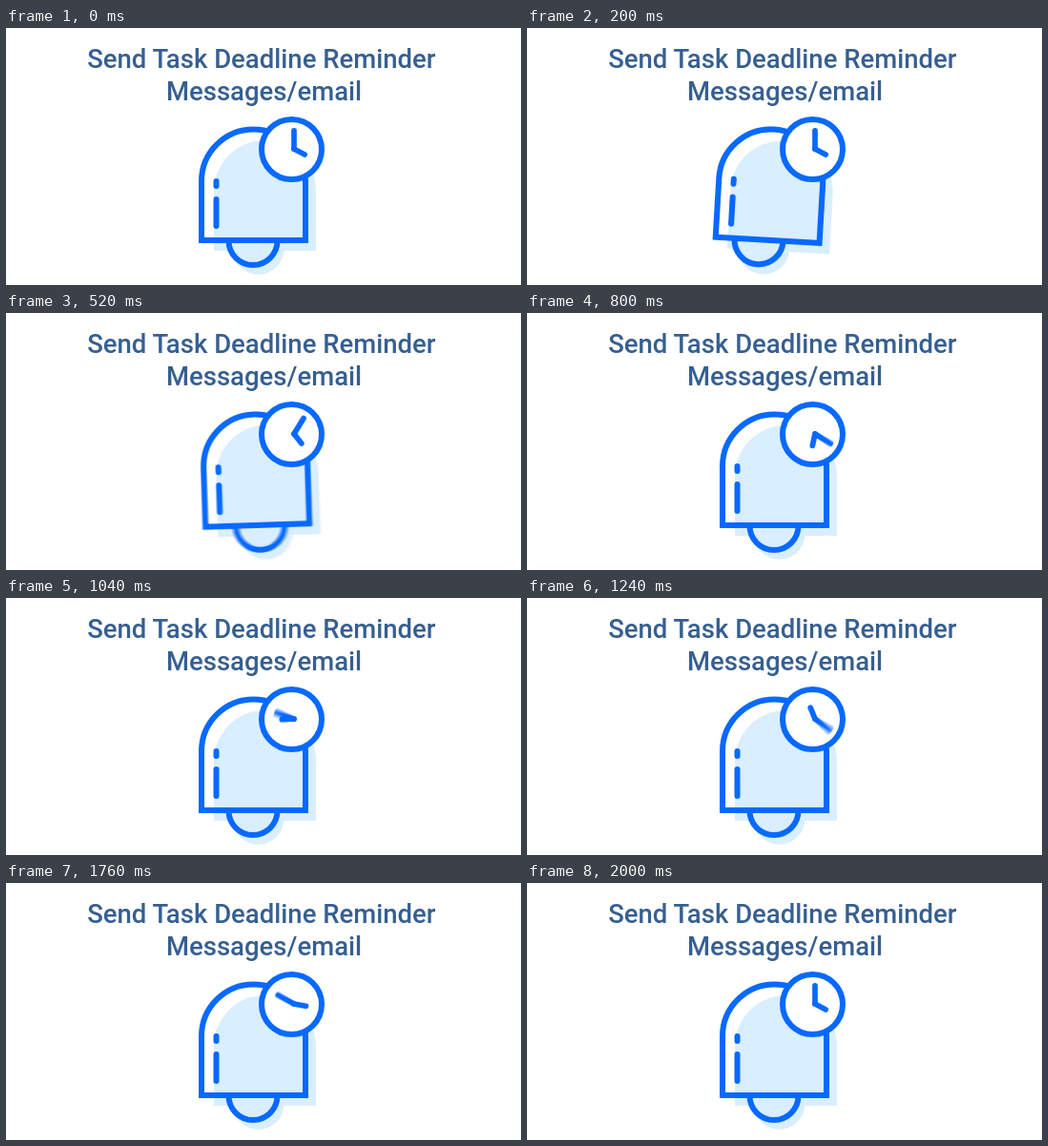
An HTML page with a canvas for the animation above (2480 ms loop, 540 by 270 pixels).

```html
<!DOCTYPE html>
<html lang="en">
<head>
<meta charset="utf-8">
<title>Deadline reminder</title>
<style>
  html, body { margin: 0; width: 100%; height: 100%; overflow: hidden; background: #fff; }
  canvas, svg { position: absolute; left: 0; top: 0; width: 540px; height: 270px; }
  text { font: 500 27.5px Roboto, "Open Sans", sans-serif; fill: #365f91; text-anchor: middle; }
</style>
</head>
<body>
<canvas id="stage" width="540" height="270"></canvas>
<svg viewBox="0 0 540 270">
  <text x="267.8" y="42">Send Task Deadline Reminder</text>
  <text x="270.5" y="76">Messages/email</text>
</svg>
<script>
const LOOP = 2480, STEP = 40, SHUTTER = 20, SAMPLES = 16;
const BLUE = '#0769ff', PALE = '#d9eeff';
const RAD = Math.PI / 180;

const out = document.getElementById('stage').getContext('2d');
const layer = document.createElement('canvas');
layer.width = 540;
layer.height = 270;
const ctx = layer.getContext('2d');

// Smooth curve through [time, value] keys, without overshoot.
function track(keys) {
  const slope = i => (keys[i + 1][1] - keys[i][1]) / (keys[i + 1][0] - keys[i][0]);
  const last = keys.length - 1;
  const tangents = keys.map((_, i) => {
    if (i === 0 || i === last) return 0;
    const a = slope(i - 1), b = slope(i);
    return a * b > 0 ? 2 * a * b / (a + b) : 0;
  });
  return t => {
    if (t <= keys[0][0]) return keys[0][1];
    if (t >= keys[last][0]) return keys[last][1];
    const i = keys.findIndex(k => k[0] > t) - 1;
    const [t0, v0] = keys[i], [t1, v1] = keys[i + 1];
    const d = t1 - t0, s = (t - t0) / d, s2 = s * s, s3 = s2 * s;
    return v0 + (v1 - v0) * (3 * s2 - 2 * s3)
      + d * (tangents[i] * (s3 - 2 * s2 + s) + tangents[i + 1] * (s3 - s2));
  };
}

const swing = track([[0, 0], [160, 3.5], [360, 0], [460, -4.6], [560, 0], [640, 0.9], [760, 0]]);
const clapper = track([[0, 0], [160, -9], [360, -1.5], [460, 8], [560, 0], [640, -2], [760, 0]]);
const minute = track([[240, 0], [360, 6], [800, 122], [1240, 487], [1560, 900], [1680, 985], [2000, 1080]]);
const hour = track([[200, 118], [360, 125], [800, 192], [1240, 338], [1560, 431], [2000, 478]]);

function dome(left, right, bottom, top) {
  const r = (right - left) / 2;
  ctx.beginPath();
  ctx.moveTo(left, bottom);
  ctx.arc(left + r, top + r, r, Math.PI, 0);
  ctx.lineTo(right, bottom);
  ctx.closePath();
}

function line(x0, y0, x1, y1) {
  ctx.beginPath();
  ctx.moveTo(x0, y0);
  ctx.lineTo(x1, y1);
  ctx.stroke();
}

function drawBell(t) {
  const shift = clapper(t);
  ctx.save();
  ctx.translate(259.5, 95);
  ctx.rotate(swing(t) * RAD);
  ctx.translate(-259.5, -95);

  ctx.fillStyle = PALE;
  dome(218, 325, 234, 118);
  ctx.fill();
  ctx.beginPath();
  ctx.arc(264.5 + shift, 232, 27, 0, Math.PI);
  ctx.fill();

  ctx.lineWidth = 6;
  ctx.beginPath();
  ctx.arc(259 + shift, 223.5, 25.5, 0, Math.PI);
  ctx.stroke();
  dome(205, 314, 223, 106.5);
  ctx.stroke();

  ctx.lineCap = 'round';
  line(220.5, 161, 220.5, 166);
  line(220.5, 180, 220.5, 208);
  ctx.restore();
}

function drawHand(angle, length) {
  const a = angle * RAD;
  line(302, 127, 302 + length * Math.sin(a), 127 - length * Math.cos(a));
}

function drawClock(t) {
  ctx.fillStyle = '#fff';
  ctx.lineWidth = 6;
  ctx.beginPath();
  ctx.arc(299.5, 127.5, 31.5, 0, 2 * Math.PI);
  ctx.fill();
  ctx.stroke();

  ctx.save();
  ctx.lineCap = 'round';
  ctx.lineWidth = 5.7;
  drawHand(minute(t), 19.2);
  drawHand(hour(t), 12.7);
  ctx.restore();
}

function drawScene(t) {
  ctx.fillStyle = '#fff';
  ctx.fillRect(0, 0, 540, 270);
  ctx.strokeStyle = BLUE;
  drawBell(t);
  drawClock(t);
}

// Averages several moments around t for motion blur.
function render(t) {
  const still = t === 0 || t >= 2000;
  const count = still ? 1 : SAMPLES;
  for (let i = 0; i < count; i++) {
    drawScene(still ? t : t + ((i + 0.5) / count - 0.5) * SHUTTER);
    out.globalAlpha = 1 / (i + 1);
    out.drawImage(layer, 0, 0);
  }
}

const start = performance.now();
let shown = -1;

function tick() {
  const t = (performance.now() - start) % LOOP;
  const stepTime = Math.min(2000, Math.floor(t / STEP) * STEP);
  if (stepTime !== shown) {
    shown = stepTime;
    render(stepTime);
  }
  requestAnimationFrame(tick);
}
tick();
</script>
</body>
</html>
```
